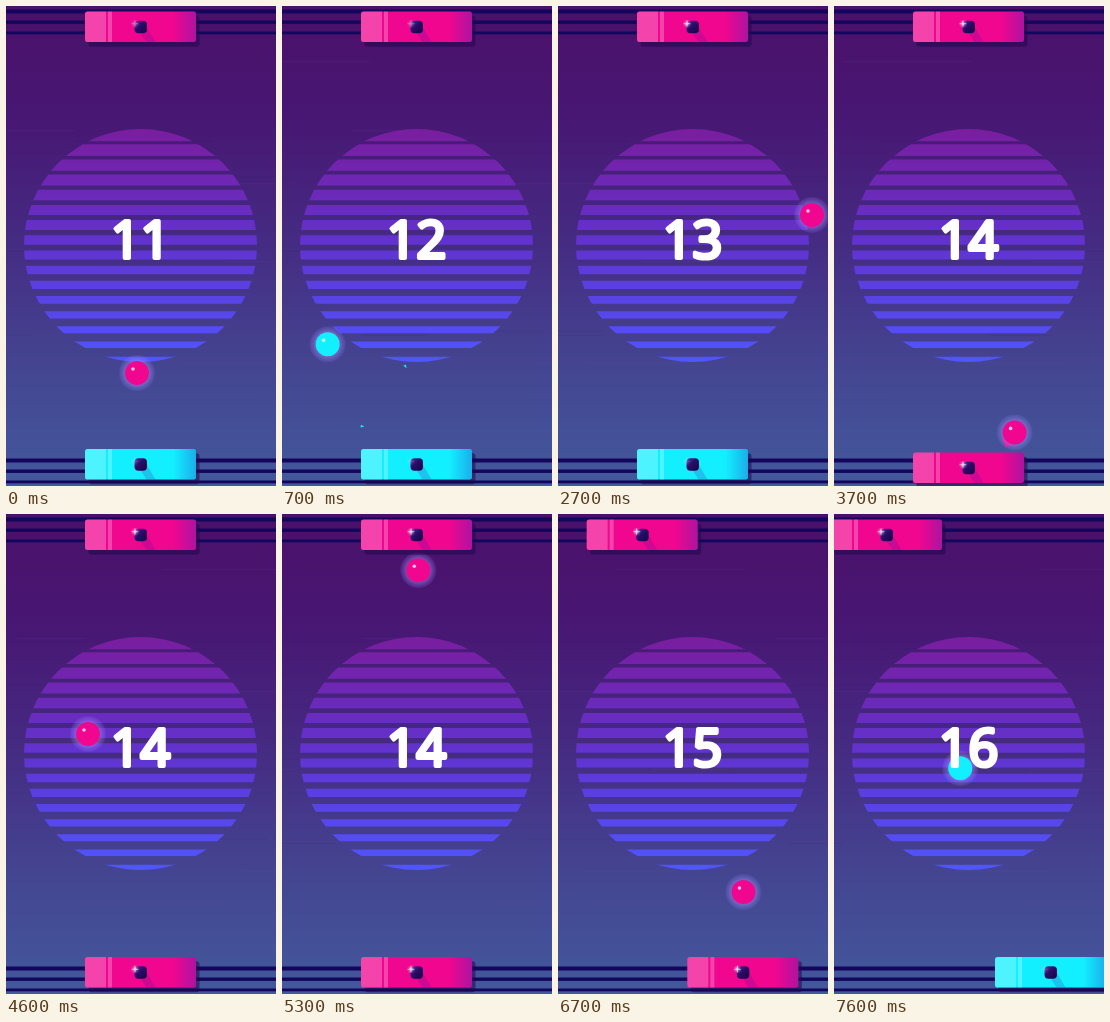
Recreate the animation shown at these times as an HTML page. Size 270 by 480 pixels, loop 7.7 s.

```html
<!DOCTYPE html>
<html lang="en">
<head>
<meta charset="utf-8">
<title>Neon paddle game</title>
<style>
html, body { margin: 0; width: 100%; height: 100%; overflow: hidden; background: #46247d; }
svg { display: block; width: 100vw; height: 100vh; }
#score { font: 400 52px "Open Sans", "Noto Sans", sans-serif; fill: #fff; stroke: #fff; stroke-width: 4.2; stroke-linejoin: round; text-anchor: middle; }
</style>
</head>
<body>
<svg viewBox="0 0 270 480" preserveAspectRatio="none">
  <defs>
    <linearGradient id="sky" x2="0" y2="1">
      <stop offset="0" stop-color="#4b1069"/>
      <stop offset=".25" stop-color="#471874"/>
      <stop offset=".5" stop-color="#452c83"/>
      <stop offset=".75" stop-color="#444591"/>
      <stop offset="1" stop-color="#43599c"/>
    </linearGradient>
    <linearGradient id="sunFill" x2="0" y2="1">
      <stop offset="0" stop-color="#7a1d9d"/>
      <stop offset=".5" stop-color="#6133cf"/>
      <stop offset="1" stop-color="#5056ff"/>
    </linearGradient>
    <linearGradient id="gem" x2="1" y2="1">
      <stop offset="0" stop-color="#5a2aa4"/>
      <stop offset=".45" stop-color="#2a0c66"/>
      <stop offset="1" stop-color="#150445"/>
    </linearGradient>
    <linearGradient id="shade">
      <stop offset="0" stop-color="#2b2fc0" stop-opacity="0"/>
      <stop offset="1" stop-color="#2b2fc0" stop-opacity=".34"/>
    </linearGradient>
    <radialGradient id="halo">
      <stop offset=".55" stop-color="#a996ff" stop-opacity=".6"/>
      <stop offset="1" stop-color="#8f7cf0" stop-opacity=".12"/>
    </radialGradient>
    <radialGradient id="glint">
      <stop offset="0" stop-color="#fff"/>
      <stop offset="1" stop-color="#fff" stop-opacity="0"/>
    </radialGradient>
    <clipPath id="sunClip"><circle cx="134.5" cy="239.5" r="116.5"/></clipPath>
    <g id="paddle">
      <rect x="-52" y="-11" width="111" height="31" rx="3" fill="#22064f" opacity=".55"/>
      <rect x="-55.5" y="-15.2" width="111" height="30.4" rx="2.5" fill="currentColor"/>
      <path d="M-53-15.2h18.5v30.4h-18.5a2.5 2.5 0 0 1-2.5-2.5v-25.4a2.5 2.5 0 0 1 2.5-2.5zM-32.5-15.2h4v30.4h-4z" fill="#fff" opacity=".25"/>
      <rect x="33" y="-15.2" width="22.5" height="30.4" rx="2.5" fill="url(#shade)"/>
      <path d="M0 6L6 0L15 15.2H6z" fill="#4416a0" opacity=".2"/>
      <rect x="-6" y="-6" width="12.5" height="12.5" rx="4" fill="url(#gem)"/>
    </g>
    <g id="spark">
      <circle r="4.5" fill="url(#glint)" opacity=".6"/>
      <path d="M0-4L.8-.8L4 0L.8.8L0 4L-.8.8L-4 0L-.8-.8z" fill="#fff"/>
    </g>
  </defs>
  <rect width="270" height="480" fill="url(#sky)"/>
  <g id="streaks"></g>
  <g id="rails" fill="#12065d"></g>
  <g clip-path="url(#sunClip)"><path id="sun" fill="url(#sunFill)"/></g>
  <g id="shards"></g>
  <g id="ball">
    <circle r="18" fill="url(#halo)"/>
    <circle r="12" fill="currentColor"/>
    <circle cx="-4" cy="-4" r="1.8" fill="#fff" opacity=".75"/>
  </g>
  <text id="score" x="134.5" y="252"></text>
  <g id="top"><use href="#paddle"/><use href="#spark" x="-5.5" y="-3"/></g>
  <g id="bottom"><use href="#paddle"/><use href="#spark" x="-5.5" y="-3"/></g>
</svg>
<script>
const LOOP = 7700, STEP = 100;
const PINK = "#f0068f", CYAN = "#12efff";
const $ = id => document.getElementById(id);
const rand = n => { const v = Math.sin(n * 127.1) * 43758.5453; return v - Math.floor(v); };

// Ball path: time, x, y at paddle hits, wall bounces and waypoints
const path = [
  [0, 131, 367], [290, 113, 431], [905, 12, 292], [1600, 126, 136],
  [1990, 190, 48], [2700, 254, 209], [2744, 258, 219], [3680, 175, 431],
  [3975, 258, 363], [4600, 82, 220], [4852, 12, 161], [5335, 146, 48],
  [5800, 209, 160], [6161, 258, 247], [6700, 185.5, 378], [6924, 155, 431],
  [7700, 122, 228]
];
const hits = [
  { t: 290, x: 113, y: 438, color: CYAN },
  { t: 1990, x: 190, y: 40, color: PINK },
  { t: 3680, x: 175, y: 438, color: PINK },
  { t: 5335, x: 146, y: 40, color: PINK },
  { t: 6924, x: 155, y: 438, color: CYAN }
];

function make(tag, parent, attrs) {
  const el = document.createElementNS("http://www.w3.org/2000/svg", tag);
  for (const k in attrs) el.setAttribute(k, attrs[k]);
  return parent.appendChild(el);
}

// Bands get thinner towards the bottom of the sun
let bands = "M18 120h233v15.2h-233z";
for (let i = 0; i < 15; i++) {
  const top = 138.2 + i * 15.18, end = 135.2 + (i + 1) * 14.78;
  bands += `M18 ${top}h233V${end}h-233z`;
}
$("sun").setAttribute("d", bands);

for (const base of [3.5, 452.5])
  for (let i = 0; i < 3; i++)
    make("rect", $("rails"), { x: 0, y: base + i * 11, width: 270, height: 4 - i * 0.6 });

const streaks = Array.from({ length: 12 }, (_, i) => make("rect", $("streaks"), {
  y: 45 + rand(i + 1) * 385, width: 60 + rand(i + 30) * 110, height: 1,
  fill: i % 2 ? "#9a6ad0" : "#240a55", opacity: 0.08
}));
const shards = Array.from({ length: 8 }, () => make("path", $("shards"), { d: "M-4-3L4 0L0 4z" }));

function ballAt(t) {
  const i = path.findIndex(p => p[0] > t);
  const [t0, x0, y0] = path[i - 1], [t1, x1, y1] = path[i];
  const k = (t - t0) / (t1 - t0);
  return [x0 + (x1 - x0) * k, y0 + (y1 - y0) * k];
}

function place(id, x, y, color) {
  $(id).setAttribute("transform", `translate(${x} ${y})`);
  $(id).style.color = color;
}

function drawShards(hit, age) {
  const life = 560, dir = hit.y < 240 ? 1 : -1;
  shards.forEach((el, i) => {
    // The first two outlive the rest
    const span = i < 2 ? life : 320 + rand(i) * 100;
    const k = age / span;
    const reach = i ? (i === 1 ? [14, 106] : [(rand(i + 7) - 0.5) * 130, 20 + rand(i + 17) * 75]) : [-45, 24];
    el.setAttribute("visibility", age >= 0 && k < 1 ? "visible" : "hidden");
    el.setAttribute("fill", hit.color);
    el.setAttribute("transform",
      `translate(${hit.x + reach[0] * k} ${hit.y + dir * reach[1] * k}) rotate(${i * 50 + k * 200}) scale(${Math.max(0, 1.2 - k)})`);
  });
}

function draw(t) {
  const done = hits.filter(h => h.t <= t);
  const last = done[done.length - 1];
  const recoil = y => last && Math.abs(last.y - y) < 40
    ? 4 * Math.max(0, 1 - (t - last.t) / 200) : 0;
  const slide = Math.min(82, Math.max(0, t - 5365) * 0.0377);
  const bottomColor = t >= 3680 && t < 6924 ? PINK : CYAN;

  place("top", 134.5 - slide, 20.7 - recoil(20), PINK);
  place("bottom", 134.5 + slide, 458.2 + recoil(458), bottomColor);
  $("bottom").lastElementChild.setAttribute("opacity", bottomColor === PINK ? 0.8 : 0.2);
  $("top").lastElementChild.setAttribute("opacity", t < 2000 ? 0.4 : 0.8);
  place("ball", ...ballAt(t), last ? last.color : PINK);
  $("score").textContent = 11 + done.length;
  drawShards(last || hits[0], last ? t - last.t : -1);
  streaks.forEach((el, i) =>
    el.setAttribute("x", (rand(i + 60) * 440 + t * (0.08 + rand(i + 90) * 0.12)) % 440 - 170));
}

const start = performance.now();
function tick() {
  const t = (performance.now() - start) % LOOP;
  draw(Math.floor(t / STEP) * STEP);
  requestAnimationFrame(tick);
}
tick();
</script>
</body>
</html>
```
